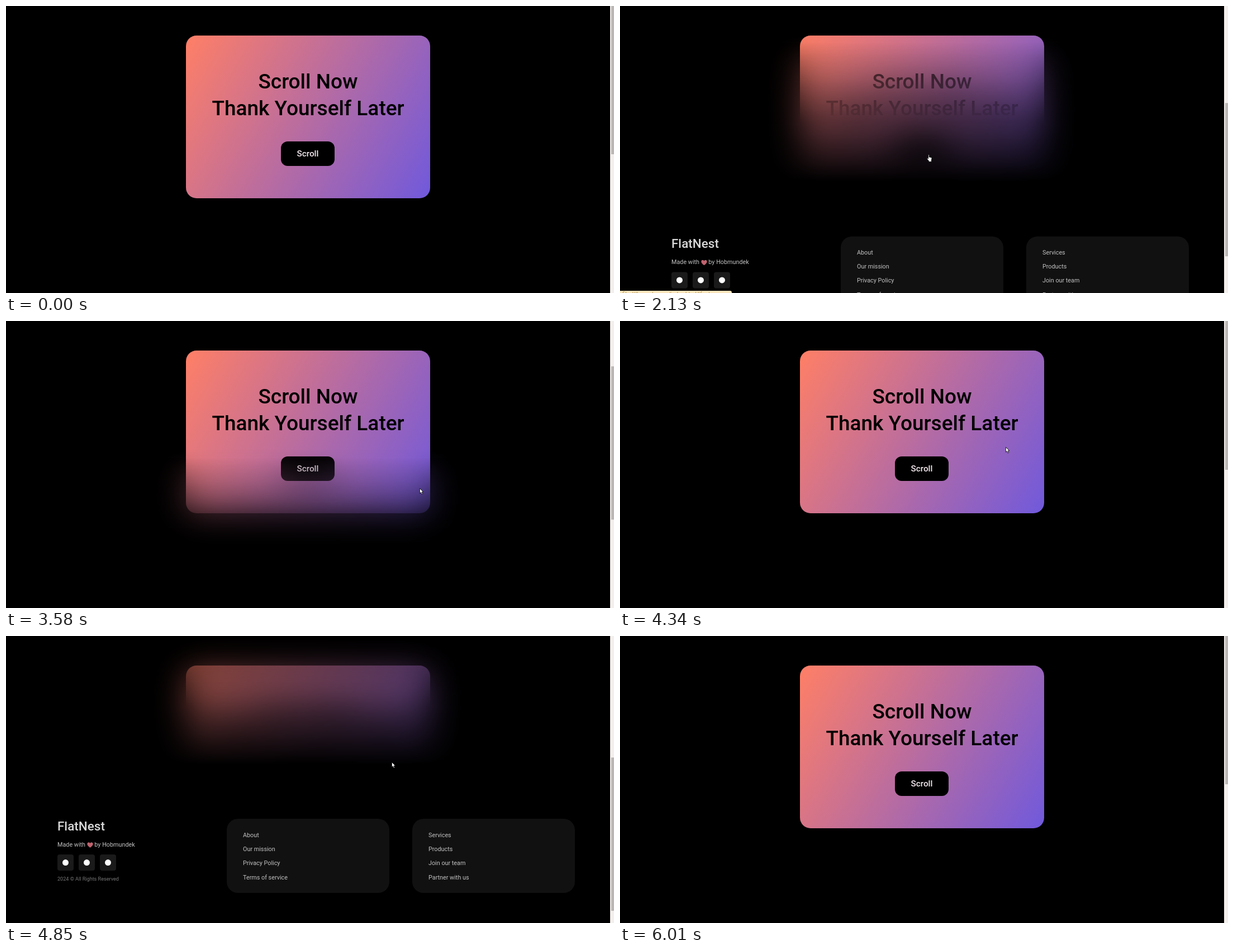
Write an HTML page that moves like this. It is 1088x515 px and loops after 6.36 s.

```html
<!DOCTYPE html>
<html lang="en">
<head>
<meta charset="utf-8">
<title>Scroll page</title>
<style>
  @property --s { syntax: '<number>'; inherits: true; initial-value: 0; }

  * { box-sizing: border-box; margin: 0; padding: 0; }
  html, body { width: 100%; height: 100%; overflow: hidden; background: #000; }

  .stage {
    position: relative; width: 1088px; height: 515px; overflow: hidden;
    background: #000; color: #c2c2c2;
    font: 400 10.8px Roboto, 'Noto Sans', sans-serif;
    animation: scroll 6360ms ease-in-out infinite;
  }
  .stage div, .stage svg, footer, h1, h2, p, ul { position: absolute; white-space: nowrap; }

  /* Sticky card */
  .hero {
    left: 322px; top: 53px; width: 437px; height: 292px; border-radius: 19px;
    background: linear-gradient(120deg, #ff7f66, #7059dc);
    color: #000; text-align: center;
  }
  h1 { left: 0; top: 59px; width: 100%; font-size: 37px; font-weight: 500; line-height: 48px; }
  .button {
    left: 170px; top: 190px; width: 96px; height: 44px; border-radius: 12px;
    background: #000; color: #f5eaf0; font-size: 15.3px; font-weight: 500; line-height: 45px;
  }

  /* Scrolled part: blur and darkness rise ahead of the footer */
  footer {
    left: 0; top: 769px; width: 1081px; height: 270px;
    transform: translateY(calc(var(--s) * -1px));
  }
  .veil, .shade { left: 0; top: -370px; width: 100%; height: 640px; }
  .veil {
    backdrop-filter: blur(30px);
    -webkit-mask-image: linear-gradient(transparent 8px, #000 168px);
    mask-image: linear-gradient(transparent 8px, #000 168px);
  }
  .shade { background: linear-gradient(transparent 22px, #000 272px); }

  h2 { left: 92px; top: -1px; color: #d8d8d8; font-size: 22.5px; font-weight: 500; line-height: 29px; }
  .made { left: 92px; top: 38px; line-height: 17px; }
  .made svg { position: static; vertical-align: -1.5px; }
  .icon { top: 64px; width: 29px; height: 29px; border-radius: 4px; background: #1b1a1b; }
  .icon::after {
    content: ''; position: absolute; left: 9px; top: 9px; width: 11px; height: 11px;
    border-radius: 50%; background: #fff;
  }
  .rights { left: 92px; top: 100px; color: #767676; font-size: 9.1px; line-height: 16px; }
  ul {
    top: 0; width: 291px; height: 133px; padding: 17px 29px; border-radius: 20px;
    background: #111; list-style: none; line-height: 25.2px;
  }

  .track { left: 1081px; top: 0; width: 7px; height: 515px; background: #f3efec; }
  .thumb {
    left: 2px; top: -9px; width: 5px; height: 275px; background: #bbb7b4;
    transform: translateY(calc(var(--s) * .515px));
  }

  .status {
    left: 0; top: 511px; width: 200px; height: 16px; padding: 0 4px; overflow: hidden;
    border-radius: 0 3px 0 0; background: #fce6bc; color: #a98d4c; font-size: 10px; line-height: 14px;
    animation: status 6360ms step-end infinite;
  }

  .cursor { left: 0; top: 0; animation: move 6360ms linear infinite; }
  .cursor svg { left: 0; top: 0; overflow: visible; fill: #fff; stroke: #000; stroke-width: .8; }
  .arrow { animation: arrow 6360ms step-end infinite; }
  .hand { animation: hand 6360ms step-end infinite; }

  @keyframes scroll {
    0%, 28.302% { --s: 0; }
    35.535%, 50.157% { --s: 425; }
    61.321%, 67.767% { --s: 0; }
    78.396%, 81.761% { --s: 480; }
    91.667%, 100% { --s: 0; }
  }
  @keyframes move {
    0%, 6.761% { transform: translate(1027px, 475px); animation-timing-function: ease-in-out; }
    12.893%, 15.409% { transform: translate(679px, 155px); animation-timing-function: ease-in-out; }
    19.969%, 24.686% { transform: translate(562px, 266px); }
    26.73% { transform: translate(549px, 266px); }
    40.409% { transform: translate(549px, 266px); animation-timing-function: ease-in; }
    44.182% { transform: translate(864px, 355px); animation-timing-function: ease-out; }
    46.226% { transform: translate(1036px, 400px); animation-timing-function: ease-in-out; }
    50%, 60.692% { transform: translate(740px, 300px); animation-timing-function: ease-out; }
    63.05%, 86.478% { transform: translate(690px, 226px); animation-timing-function: ease-in; }
    90.566%, 100% { transform: translate(1090px, 516px); }
  }
  @keyframes arrow {
    0% { opacity: 0; }
    6.761% { opacity: 1; }
    25.786% { opacity: 0; }
    40.9% { opacity: 1; }
    90.566%, 100% { opacity: 0; }
  }
  @keyframes hand {
    0% { opacity: 0; }
    25.786% { opacity: 1; }
    40.9%, 100% { opacity: 0; }
  }
  @keyframes status {
    0% { opacity: 0; }
    25.786% { opacity: 1; }
    41.5%, 100% { opacity: 0; }
  }
</style>
</head>
<body>
<div class="stage">
  <div class="hero">
    <h1>Scroll Now<br>Thank Yourself Later</h1>
    <div class="button">Scroll</div>
  </div>

  <footer>
    <div class="veil"></div>
    <div class="shade"></div>
    <h2>FlatNest</h2>
    <p class="made">Made with
      <svg width="11" height="10" viewBox="0 0 11 10"><path fill="#c0636f" d="M5.5 9.8C2 7 .3 5.3 .3 3.2A2.7 2.7 0 0 1 5.5 2A2.7 2.7 0 0 1 10.7 3.2C10.7 5.3 9 7 5.5 9.8Z"/></svg>
      by Hobmundek</p>
    <div class="icon" style="left:92px"></div>
    <div class="icon" style="left:130px"></div>
    <div class="icon" style="left:168px"></div>
    <p class="rights">2024 © All Rights Reserved</p>
    <ul style="left:395px">
      <li>About</li><li>Our mission</li><li>Privacy Policy</li><li>Terms of service</li>
    </ul>
    <ul style="left:727px">
      <li>Services</li><li>Products</li><li>Join our team</li><li>Partner with us</li>
    </ul>
  </footer>

  <div class="status">file:///home/pages/index.html#footer</div>
  <div class="track"><div class="thumb"></div></div>

  <div class="cursor">
    <svg class="arrow" width="8" height="12"><path d="M.4 .3V9.3L2.4 7.5L3.9 11L5.5 10.3L4 6.9H6.8Z"/></svg>
    <svg class="hand" width="10" height="14"><path d="M2.6 1.4Q3.4 .3 4.2 1.4V5L8 5.8Q9.2 6.2 9 7.6L8.3 11V13.4H3.5V12L.5 8.5Q.2 7.3 1.4 7.3L2.6 8.2Z"/></svg>
  </div>
</div>
</body>
</html>
```
